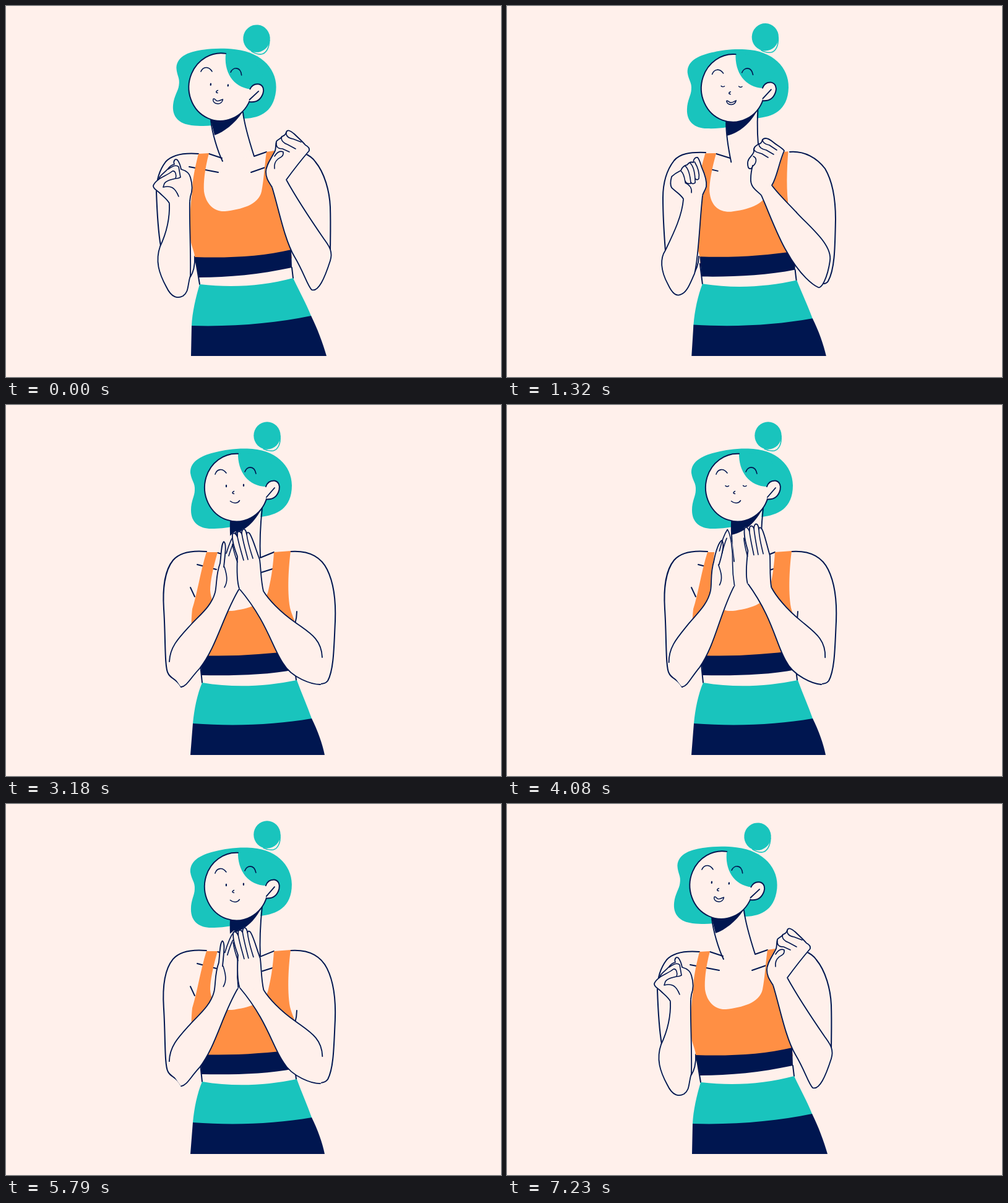
An HTML page with a canvas for the animation above (7.53 s loop, 800x600 px).

```html
<!DOCTYPE html>
<html lang="en">
<head>
<meta charset="utf-8">
<title>Clapping woman</title>
<style>
  html, body { margin: 0; width: 100%; height: 100%; overflow: hidden; background: #fff0eb; }
  canvas { display: block; width: 800px; height: 600px; }
</style>
</head>
<body>
<canvas id="stage" width="800" height="600"></canvas>
<script>
const ctx = document.getElementById('stage').getContext('2d');
const SKIN = '#fff0eb', TEAL = '#19c4bd', NAVY = '#001650', ORANGE = '#ff8f44';
const LOOP = 7530, CLAP = 600, BEAT = 3180;
const RAD = Math.PI / 180;

const clamp = x => Math.max(0, Math.min(1, x));
const ease = x => (x = clamp(x)) < 0.5 ? 4 * x ** 3 : 1 - 4 * (1 - x) ** 3;
const easeOut = x => 1 - (1 - clamp(x)) ** 2;
const NUM = /-?[\d.]+/g;

// Blend two path strings that share the same commands.
function blend(a, b, k) {
  const to = b.match(NUM);
  let i = 0;
  return a.replace(NUM, n => (+n + (to[i++] - n) * k).toFixed(2));
}
function fill(d, color) {
  ctx.fillStyle = color;
  ctx.fill(new Path2D(d));
}
function line(d, width = 1.9, color = NAVY) {
  ctx.lineWidth = width;
  ctx.strokeStyle = color;
  ctx.stroke(new Path2D(d));
}
function turn(x, y, deg) {
  ctx.translate(x, y);
  ctx.rotate(deg * RAD);
  ctx.translate(-x, -y);
}

// Body sway: 0 = leaning back, 1 = upright.
const sway = t => t < 4000 ? ease((t - 130) / 2020) : ease((7300 - t) / 1667);

// Torso parts as [leaning, upright].
const BODY = {
  neck: ['M331 175L331 185C333 205 342 235 350 251L401 243C393 218 383 190 382 170Z',
         'M363 175L363 188C362 208 364 230 367 253L411 247C409 225 410 190 413 160Z'],
  neckLeft: ['M331 185C333 205 342 235 350 251', 'M363 188C362 208 364 230 367 253'],
  neckRight: ['M421 236L401 243C393 218 385 190 383 172', 'M433 238L411 247C410 225 411 195 414 167'],
  shade: ['M331 175L331 185L337 209C352 204 370 190 382 172Z',
          'M363 175L363 188L363 210C385 205 402 190 414 166Z'],
  bones: ['M328 239L349 246M296 260L343 269M396 269L419 261',
          'M342 239L365 246M309 258L340 266M412 271L431 265'],
  creases: ['M283 293L292 308M462 332C461 342 460 345 459 350',
            'M298 295L305 310M470 334C470 343 469 347 467 354'],
  armBack: ['M305 405C306 420 302 432 298 438', 'M312 405C311 418 306 428 300 436'],
  top: ['M311 239L328 238C321 265 319 285 320 300C323 320 336 333 354 332C380 329 408 322 413 300C417 280 418 255 421 236L440 233C440 270 442 305 448 335C453 352 456 370 459 384L462 408L308 422L305 405C304 395 298 385 298 375C296 350 298 320 301 300C301 280 306 260 311 239Z',
        'M324 238L342 238C335 262 330 285 330 300C332 325 345 334 365 333C390 330 420 322 424 300C430 275 432 255 433 238L460 236C457 260 454 300 459 328C462 340 466 346 467 353L468 412L315 422L314 405C312 395 305 385 303 375C299 362 299 350 301 330C309 305 314 270 324 238Z'],
  band: ['M305 406C360 408 415 405 461 394L462 423C410 434 360 439 312 439Z',
         'M314 405C370 407 420 403 468 397L467 428C420 437 365 438 316 437Z'],
  skirt: ['M313 450C365 456 415 453 464 440C475 463 485 481 493 501L497 512L300 530L300 517C301 495 307 470 313 450Z',
          'M317 449C370 458 420 455 470 445C478 467 487 487 494 507L498 518L302 530L302 515C304 492 309 468 317 449Z'],
  hem: ['M300 517C370 519 435 513 493 501C503 521 512 545 518 566L299 566Z',
        'M302 515C370 520 435 517 494 507C504 527 511 547 515 566L298 566Z'],
  waist: ['M306 408L313 450M462 423L464 440', 'M314 420L317 449M467 428L469 445']
};

// Arm poses: raised fists, drawing in, palms together, pulling apart.
const LEFT = {
  x: 283, y: 456, dir: -4,
  upper: {
    rest: 'M311 239C285 237 268 241 258 252C246 268 243 285 243 300C244 330 246 365 250 388C250 388 250 388 250 388',
    near: 'M321 237C295 236 279 239 270 250C256 268 252 288 252 310C252 345 254 370 256 396C256 396 256 396 256 396',
    palm: 'M324 237C300 235 281 238 270 251C256 268 253 300 255 330C258 375 256 425 262 434C266 443 275 442 283 456',
    away: 'M317 238C290 236 276 239 267 250C253 268 250 288 250 305C250 340 252 370 254 391C254 391 254 391 254 391'
  },
  fore: {
    rest: 'M264 319C265 345 258 370 249 389C241 412 247 432 259 454C268 473 278 473 286 469C296 462 293 452 298 436C299 400 296 340 297 316',
    near: 'M285 312C283 340 268 370 256 395C247 408 248 428 260 450C268 467 274 469 280 467C291 464 296 448 303 433C310 405 311 350 316 306',
    palm: 'M338 303C332 325 315 338 300 354C280 376 265 390 264 415C264 430 275 445 283 456C292 455 297 443 313 426C341 390 350 342 377 297',
    away: 'M279 319C280 345 266 372 255 391C245 410 246 430 259 455C267 471 277 474 284 469C297 458 300 448 302 433C307 400 305 345 311 317'
  },
  fist: {
    x: 264, y: 319, tilt: 3,
    edge: 'M264 319C260 312 254 308 249 303C244 298 238 296 238 291C239 286 244 283 247 280C247 275 255 271 262 263C265 259 268 257 272 256C270 251 273 246 277 249C281 254 282 259 283 264C290 266 296 269 298 277C301 287 302 298 298 308L297 316',
    lines: 'M247 280C255 275 263 272 269 267C274 266 276 274 274 279C268 281 260 281 256 287L254 293M262 264C270 258 276 257 279 260L282 277C279 279 276 279 274 279M254 293C266 290 273 293 279 308'
  },
  loose: {
    x: 285, y: 312, tilt: 0,
    edge: 'M285 312C280 304 272 300 266 294C263 289 264 283 266 276C272 270 277 268 281 266C283 260 287 258 291 257C294 253 298 252 301 253C301 248 304 244 308 245C312 250 313 257 315 262C319 271 323 283 322 292C320 299 317 302 316 306',
    lines: 'M281 267C286 271 287 279 288 285M288 259C294 264 296 276 297 287C292 288 289 286 288 283M296 254C302 260 304 272 304 286C300 289 298 287 297 285M303 252C309 262 311 272 310 279C308 282 305 281 304 279M288 286C295 289 299 295 298 302'
  }
};
const RIGHT = {
  x: 508, y: 452, dir: 5,
  upper: {
    rest: 'M460 234C475 234 492 240 500 252C515 270 523 300 524 325C525 355 524 380 524 404C524 404 524 404 524 404',
    near: 'M457 236C481 234 501 246 514 263C527 285 531 313 531 345C530 390 530 425 519 445C517 448 515 449 512 449',
    palm: 'M460 237C490 235 509 246 519 266C532 292 533 325 532 350C530 390 530 428 520 446C517 450 513 451 508 451',
    away: 'M456 236C480 234 500 245 513 263C525 288 529 318 528 345C527 370 525 395 525 410C524 430 519 440 515 444'
  },
  fore: {
    rest: 'M453 281C470 312 492 345 514 377C521 387 529 396 524 412C515 440 505 463 494 459C487 452 482 432 466 405C450 378 440 325 430 293',
    near: 'M428 290C440 306 457 322 468 334C490 358 526 386 522 412C518 440 508 458 503 455C496 452 474 437 452 397C437 372 423 333 411 306',
    palm: 'M416 301C424 314 442 334 468 352C490 368 510 378 511 408C515 430 515 445 508 452C495 452 462 442 448 418C430 392 422 350 377 297',
    away: 'M429 290C440 306 454 322 466 333C488 358 530 388 524 412C519 440 512 460 504 458C496 456 480 440 454 395C438 368 423 333 408 305'
  },
  fist: {
    x: 453, y: 281, tilt: -8.8,
    edge: 'M453 281C464 266 478 248 490 234C491 230 488 227 484 225C478 218 472 213 466 207C460 202 455 199 453 204C452 208 449 210 446 211C444 215 440 215 437 219C435 225 437 231 434 236C429 246 420 257 420 268C420 280 426 286 430 293',
    lines: 'M453 204C452 211 458 214 464 215L477 220M446 211C443 217 449 222 455 224L468 231M437 221C436 229 441 231 447 231L458 236M434 243C439 235 444 234 448 236C449 243 444 245 440 247C435 251 433 256 434 263'
  },
  loose: {
    x: 428, y: 290, tilt: 0,
    edge: 'M428 290C436 278 439 255 448 234C443 228 437 226 430 220C424 215 417 212 413 216C412 220 410 223 407 223C402 226 398 228 399 236C396 244 389 245 389 254C389 260 390 264 394 263C396 262 397 260 397 258C395 266 394 271 394 279C393 293 403 298 411 306',
    lines: 'M413 216C413 222 419 224 424 225L436 233M407 223C407 230 414 232 419 233L431 240M399 231C400 237 407 237 412 239L422 245M398 243C405 246 403 255 397 259'
  }
};

const OPEN_LEFT = {
  x: 338, y: 303, tilt: 0,
  cover: 'M338 303C341 290 339 275 346 256L352 221L371 205L377 230L377 297Z',
  edge: ['M338 303C341 290 339 275 346 256C348 240 348 224 352 221C357 224 354 242 352 262',
         'M338 303C341 290 339 275 346 256C350 240 356 225 361 223C365 228 360 246 354 262'],
  lines: 'M353 262C357 275 359 285 353 295M356 240C359 230 364 215 371 206C376 215 378 240 376 262C375 280 376 288 377 297M360 244C363 234 366 226 369 220'
};
const OPEN_RIGHT = {
  x: 416, y: 301, tilt: 0,
  edge: 'M416 301C412 285 412 265 410 250C404 235 398 212 393 207C390 205 389 207 389 209C388 203 386 200 383 201C381 203 381 206 381 208C379 204 375 203 374 207L374 213C371 207 368 206 366 209C365 218 369 232 374 245C373 265 373 285 377 297',
  lines: 'M389 209C391 225 396 238 399 248M381 208C384 225 388 238 391 250M374 213C377 228 381 240 384 251M366 225C368 238 371 245 374 254'
};

function clapState(t) {
  if (t < 1820 || t > 5640) return { gap: 0, lean: t < 4000 ? 1 : 0 };
  const ph = (((t - BEAT) % CLAP) + CLAP) % CLAP;
  const gap = ph > 60 && ph < 440 ? Math.sin(Math.PI * (ph - 60) / 380) ** 2 : 0;
  return { gap, lean: ph < 60 ? 0 : ph < 500 ? clamp((ph - 60) / 120) : 1 - (ph - 500) / 100 };
}

// Which two poses to mix, which hand to show and how far it is tilted.
function armState(t) {
  if (t < 1320) {
    const k = sway(t) / sway(1320);
    return { from: 'rest', to: 'near', k, hand: t < 1050 ? 'fist' : 'loose', tilt: k, palm: 0 };
  }
  if (t < 1820) {
    const k = ease((t - 1320) / 500) * 0.5 + easeOut((t - 1320) / 500) * 0.5;
    return { from: 'near', to: 'palm', k, hand: t < 1560 ? 'loose' : 'open', tilt: 0, palm: k };
  }
  if (t <= 5640) return { from: 'palm', to: 'palm', k: 0, hand: 'open', tilt: 0, palm: 1 };
  if (t < 6420) {
    const k = ease((t - 5640) / 780);
    return { from: 'palm', to: 'away', k, hand: t < 6030 ? 'open' : 'fist', tilt: 1, palm: 1 - k };
  }
  const k = 1 - sway(t) / sway(6420);
  return { from: 'away', to: 'rest', k, hand: 'fist', tilt: 1 - k, palm: 0 };
}

function drawHand(hand, x, y, deg, lean) {
  ctx.save();
  ctx.translate(x, y);
  ctx.rotate(deg * RAD);
  ctx.translate(-hand.x, -hand.y);
  const edge = Array.isArray(hand.edge) ? blend(...hand.edge, lean) : hand.edge;
  const cover = hand.cover || edge + 'Z';
  fill(cover, SKIN);
  line(cover, 1.5, SKIN);
  line(edge, 1.8);
  line(hand.lines, 1.6);
  ctx.restore();
}

function drawForearm(arm, open, s, clap) {
  const d = blend(arm.fore[s.from], arm.fore[s.to], s.k);
  const [start, a, b, elbow, c, e] = d.split('C');
  const [x, y] = start.match(NUM);
  ctx.save();
  turn(arm.x, arm.y, arm.dir * clap.gap);
  fill(d, SKIN);
  // Palms together: the elbow belongs to the upper arm outline.
  const joint = s.palm > 0.6 ? 'M' + elbow.match(NUM).slice(-2).join(' ') : 'C' + elbow;
  line(start + 'C' + a + 'C' + b + joint + 'C' + c + 'C' + e, 1.8);
  const hand = s.hand === 'open' ? open : arm[s.hand];
  const deg = s.hand === 'open' ? arm.dir * 4 * (1 - s.palm) : hand.tilt * s.tilt;
  drawHand(hand, +x, +y, deg, clap.lean);
  ctx.restore();
}

function headFrame(p) {
  ctx.save();
  ctx.translate(-25.5 * (1 - p), -2.5 * (1 - p));
  turn(372.5, 133.5, 6 * (1 - p));
}

function drawHair(p) {
  headFrame(p);
  ctx.fillStyle = TEAL;
  ctx.beginPath();
  ctx.ellipse(422, 49.5, 21.7, 22.2, 0, 0, 7);
  ctx.fill();
  fill('M442 60C438 67 432 71 424 72.5C433 75 441 69 442 60Z', SKIN);
  line('M443 50C444 62 440 72 432 74C426 75 420 73 416 71', 1.6, TEAL);
  fill('M390 70.5C370 70 352 73 340 76C318 81 297 90 298 110C300 123 306 126 305 138C305 147 299 155 299 170C299 190 312 200 332 200C345 200 355 199 364 197L412 181C437 178 462 168 462 130C462 98 435 71 390 70.5Z', TEAL);
  ctx.restore();
}

function drawFace(p, shut) {
  headFrame(p);
  ctx.fillStyle = SKIN;
  ctx.beginPath();
  ctx.ellipse(372.5, 133.5, 51.5, 54.8, 0, 0, 7);
  ctx.fill();
  fill('M375 77C374 108 392 132 421 132L424 134L440 110L420 80Z', TEAL);
  ctx.strokeStyle = NAVY;
  ctx.lineWidth = 1.9;
  ctx.beginPath();
  ctx.ellipse(372.5, 133.5, 51.5, 54.8, 0, 0.31, Math.PI * 1.5 + 0.05);
  ctx.stroke();
  const ear = 'M420 132C422 126 427 122 434 122.5C441 124 443 131 441.5 137C439 147 432 153 421 152.5';
  fill(ear, SKIN);
  line(ear + 'M434 134L421 149');
  line('M338 112C341 103 350 102 356 110M386 108C389 99 401 97 404 111', 1.6);
  line('M368.5 139.5C366 140.5 364.5 143 368.5 143.5', 1.5);
  if (shut) {
    line('M353 130.5C354.5 132.2 357 132.2 358.5 130.8M381.5 130.3C383 132 385.5 132 387 130.5', 1.4);
  } else {
    ctx.fillStyle = NAVY;
    for (const [x, y] of [[356, 131], [384, 129.7]]) {
      ctx.beginPath();
      ctx.ellipse(x, y, 1.2, 2.2, 0, 0, 7);
      ctx.fill();
    }
  }
  line(blend(
    'M362.5 154C362 157 364 161 370 161C375 161 378 157 378 153C375 154 372 157 369 156.5C366 156 365 152 362.5 154Z',
    'M362.5 155.5C365 157.5 367 158.5 370 158.5C373 158.5 376 157 377.5 154.5C376 157 373 158.5 370 158.5C367 158.5 365 157.5 362.5 155.5Z',
    p ** 4), 1.5);
  ctx.restore();
}

function draw(t) {
  const p = sway(t), s = armState(t), clap = clapState(t);
  const part = name => blend(...BODY[name], p);
  fill('M0 0H800V600H0Z', SKIN);

  drawHair(p);
  fill(part('neck'), SKIN);
  fill(part('shade'), NAVY);
  line(part('neckLeft'));
  line(part('neckRight'));
  drawFace(p, (t > 1200 && t < 1440) || clap.gap > 0.75);

  line(part('bones'));
  for (const arm of [LEFT, RIGHT]) line(blend(arm.upper[s.from], arm.upper[s.to], s.k), 2);
  line(part('armBack'));
  fill(part('top'), ORANGE);
  line(part('creases'));
  fill(part('band'), NAVY);
  line(part('waist'), 2);
  fill(part('skirt'), TEAL);
  fill(part('hem'), NAVY);

  drawForearm(LEFT, OPEN_LEFT, s, clap);
  drawForearm(RIGHT, OPEN_RIGHT, s, clap);
}

ctx.lineCap = ctx.lineJoin = 'round';
const begin = performance.now();
function tick() {
  draw((performance.now() - begin) % LOOP);
  requestAnimationFrame(tick);
}
tick();
</script>
</body>
</html>
```
